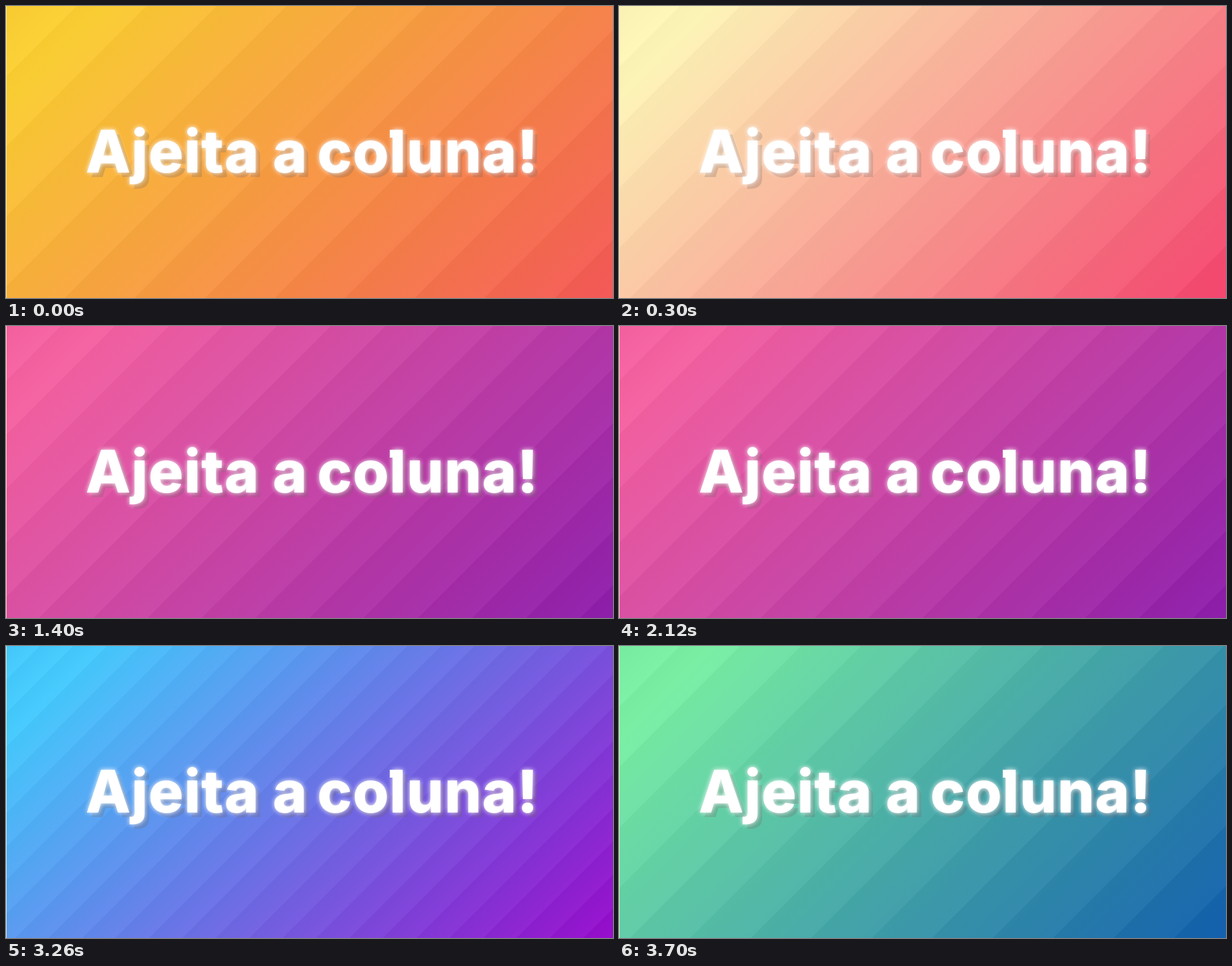
These frames come from a looping animation (1079x519 px, 4.3 s). An HTML page:

```html
<!DOCTYPE html>
<html lang="pt">
<head>
<meta charset="utf-8">
<style>
  html, body { margin: 0; width: 100%; height: 100%; overflow: hidden; }
  #stage {
    position: relative; box-sizing: border-box; width: 1079px; height: 519px;
    border-left: 1px solid #fdeec8;
    /* Faint diagonal bands over the scene's gradient. */
    background:
      repeating-linear-gradient(135deg, rgb(0 0 0 / .025), rgb(255 255 255 / .035) var(--band)),
      linear-gradient(135deg, var(--from) 10%, var(--to));
  }
  .word {
    position: absolute; top: 206px; transform: translateX(-50%); white-space: nowrap;
    font: 800 104px/104px Inter, sans-serif;
    font-variation-settings: 'opsz' 22;
    letter-spacing: 1px;
    color: #fff;
    text-shadow: 0 0 8px #fff, 8px 8px rgb(110 95 95 / .25);
  }
  /* The l has a small flag at its top left. */
  .flag {
    display: inline-block;
    background: linear-gradient(#fff 0 0) 1px 14px / 7px 14px no-repeat;
  }
</style>
</head>
<body>
<div id="stage">
  <span class="word" style="left: 295px">Ajeita</span>
  <span class="word" style="left: 504px">a</span>
  <span class="word" style="left: 749px">co<span class="flag">l</span>una!</span>
</div>
<script>
const LOOP = 4300;
const scenes = [
  { end: 300, from: '#fccf31', to: '#f55555', band: 88 },
  { end: 1400, from: '#fff6b7', to: '#f6416c', band: 76 },
  { end: 2600, from: '#f761a1', to: '#8c1bab', band: 68 },
  { end: 3700, from: '#43cbff', to: '#9708cc', band: 42 },
  { end: LOOP, from: '#79f1a4', to: '#0e5cad', band: 76 }
];
const { style } = document.getElementById('stage');

function draw() {
  const time = performance.now() % LOOP;
  const { from, to, band } = scenes.find(scene => time < scene.end);
  style.setProperty('--from', from);
  style.setProperty('--to', to);
  style.setProperty('--band', `${band}px`);
  requestAnimationFrame(draw);
}
draw();
</script>
</body>
</html>
```
